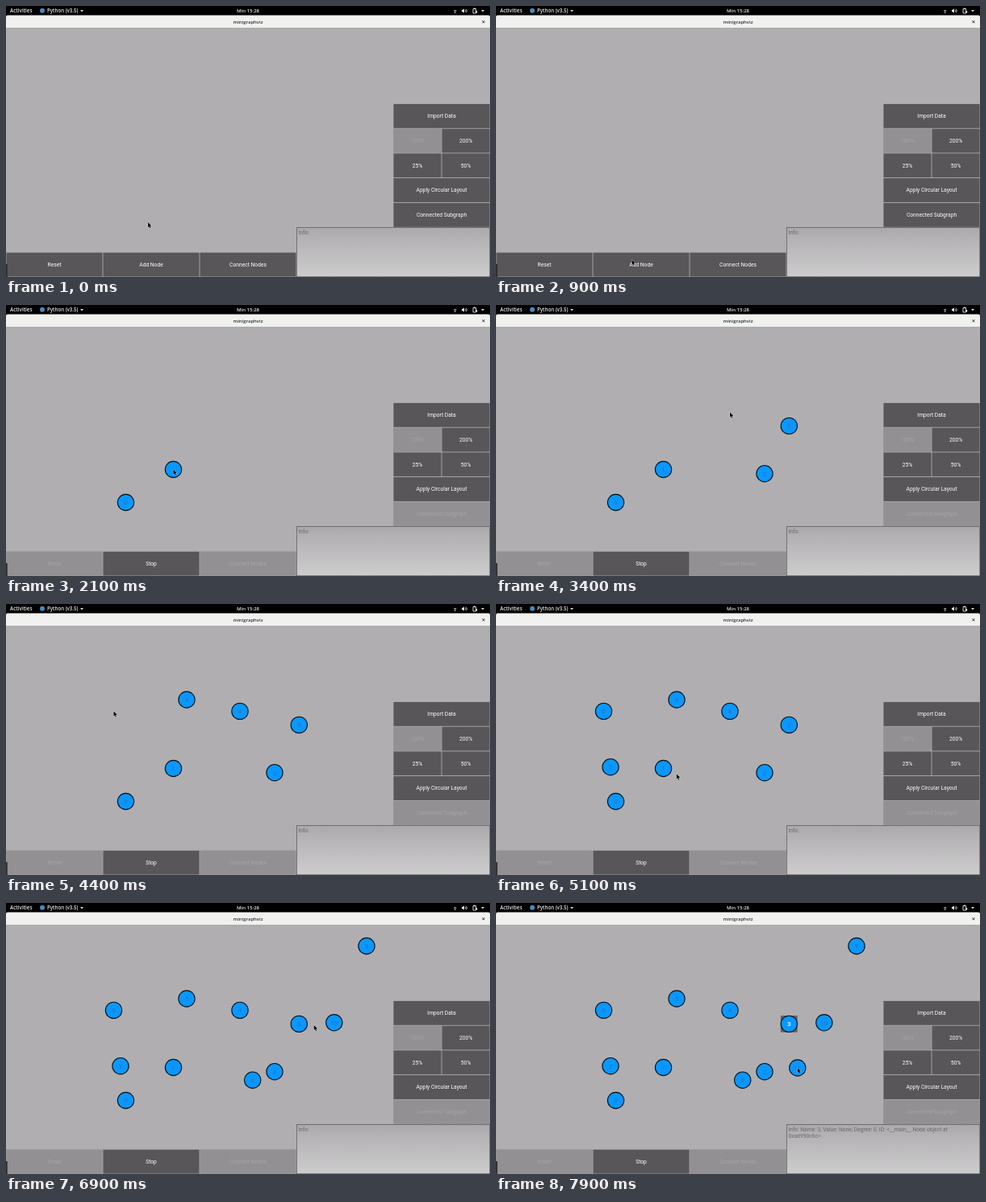
Animation, 600 px wide and 337 px high, one loop 8000 ms. Source, as an HTML page with a canvas:

```html
<!DOCTYPE html>
<html lang="en">
<head>
<meta charset="utf-8">
<title>minigraphviz</title>
<style>
html, body { margin: 0; width: 100%; height: 100%; overflow: hidden; background: #b0aeb0; }
canvas { display: block; width: 100vw; height: 100vh; }
</style>
</head>
<body>
<canvas id="stage"></canvas>
<script>
const W = 600, H = 337, LOOP = 8000, STEP = 100;
const canvas = document.getElementById('stage');
const ctx = canvas.getContext('2d');
const UI = 'Roboto, sans-serif';
const SHELL = '"Open Sans", "Noto Sans", sans-serif';
const BG = '#b0aeb0', DARK = '#585658', MUTED = '#929092', LIGHT = '#e6e6e6';
const ADD_MODE = 1000, SELECT = 7200;
const REST = 200, TRAVEL = 300;
const ROW = 30.75, COL = 120, PANEL_Y = 275.2;

// Places the pointer visits and the moment it leaves; a click there may add a node
const stop = (t, x, y) => ({ t, x, y });
const click = (t, x, y) => ({ t, x, y, adds: true });
const stops = [
  stop(400, 176, 269), stop(1100, 168.5, 315.5),
  click(1700, 148.5, 245.5), click(2100, 207.5, 204.5),
  click(2500, 333, 209.7), click(3100, 363.3, 150.4),
  click(3700, 290, 133.4), click(4000, 224, 119),
  click(4600, 133.5, 133.4), click(5000, 142, 202.7),
  click(5400, 305.7, 220.2), stop(5900, 420, 71.5),
  click(6200, 447, 53.5), click(6700, 406.8, 148.8),
  stop(SELECT, 373, 153), click(7700, 373.8, 205)
];
const nodes = stops.filter(s => s.adds);

// Each trip ends in time to rest before the next click
function pointerAt(t) {
  const i = stops.findIndex(s => s.t > t);
  if (i === 0) return stops[0];
  if (i < 0) return stops[stops.length - 1];
  const a = stops[i - 1], b = stops[i];
  const u = Math.min(1, (t - a.t) / Math.min(TRAVEL, b.t - a.t - REST));
  const k = u * u * (3 - 2 * u);
  return { x: a.x + (b.x - a.x) * k, y: a.y + (b.y - a.y) * k };
}

function rect(x, y, w, h, fill) {
  ctx.fillStyle = fill;
  ctx.fillRect(x, y, w, h);
}

function text(str, x, y, size, color, family = UI, align = 'center', weight = 400) {
  ctx.font = `${weight} ${size}px ${family}`;
  ctx.textAlign = align;
  ctx.fillStyle = color;
  ctx.fillText(str, x, y);
}

function poly(points, fill) {
  ctx.beginPath();
  points.forEach(([x, y]) => ctx.lineTo(x, y));
  ctx.closePath();
  ctx.fillStyle = fill;
  ctx.fill();
}

function disc(x, y, r, fill) {
  ctx.beginPath();
  ctx.arc(x, y, r, 0, Math.PI * 2);
  ctx.fillStyle = fill;
  ctx.fill();
}

function stroke(width, color, trace) {
  ctx.beginPath();
  trace();
  ctx.lineWidth = width;
  ctx.strokeStyle = color;
  ctx.stroke();
}

function button(label, x, y, w, off) {
  rect(x, y, w, ROW, off ? '#a3a1a3' : '#b5b3b5');
  rect(x + 0.4, y + 0.4, w - 0.8, ROW - 0.8, off ? MUTED : DARK);
  text(label, x + w / 2, y + ROW / 2 + 2.2, 6.7, off ? '#a6a4a6' : '#fff');
}

function controls(adding) {
  const side = [['Import Data'], ['100%', '200%'], ['25%', '50%'],
    ['Apply Circular Layout'], ['Connected Subgraph']];
  side.forEach((row, i) => row.forEach((label, j) => {
    const w = COL / row.length;
    const off = label === '100%' || (adding && label === 'Connected Subgraph');
    button(label, W - COL + j * w, PANEL_Y - ROW * (side.length - i), w, off);
  }));
  ['Reset', adding ? 'Stop' : 'Add Node', 'Connect Nodes'].forEach((label, i) =>
    button(label, i * COL, H - ROW, COL, adding && i !== 1));
}

function caret(x, y) {
  poly([[x - 2, y - 1], [x + 2, y - 1], [x, y + 1.3]], LIGHT);
}

function arcs(x, y, radii, from, to) {
  radii.forEach(r => stroke(0.8, LIGHT, () => ctx.arc(x, y, r, from, to)));
}

function statusIcons() {
  arcs(556.7, 8.2, [1.4, 2.7], -Math.PI * 0.72, -Math.PI * 0.28);
  disc(556.7, 8.2, 0.7, LIGHT);
  rect(565, 4.8, 1.3, 2.4, LIGHT);
  poly([[566, 5], [568, 3.2], [568, 8.8], [566, 7]], LIGHT);
  arcs(568.2, 6, [1.6, 3], -0.9, 0.9);
  stroke(0.9, LIGHT, () => ctx.rect(579, 3.5, 3.6, 5.5));
  rect(580, 2.5, 1.6, 1, LIGHT);
  rect(582.2, 6.2, 2, 2.3, LIGHT);
  caret(591, 6);
}

function shellBars() {
  const top = 11.4, bottom = 27.4;
  rect(0, 0, W, bottom, '#000');
  text('Activities', 5, 8.2, 6.3, LIGHT, SHELL, 'left', 600);
  disc(45, 5.8, 3, '#4b8bbe');
  text('Python (v3.5)', 51, 8.2, 6.15, LIGHT, SHELL, 'left', 600);
  caret(94, 6);
  text('Min 15:28', 300, 8.2, 6.05, LIGHT, SHELL, 'center', 600);
  statusIcons();
  ctx.beginPath();
  ctx.roundRect(0, top, W, bottom - top, [2, 2, 0, 0]);
  ctx.fillStyle = '#f1f1f0';
  ctx.fill();
  text('minigraphviz', 300, 21.8, 5.95, '#2e3436', SHELL, 'center', 600);
  stroke(1, '#2e3436', () => [-1.5, 1.5].forEach(d => {
    ctx.moveTo(590.4, 19.7 - d);
    ctx.lineTo(593.4, 19.7 + d);
  }));
}

function infoBox(selected) {
  const x = 3 * COL;
  const g = ctx.createLinearGradient(0, PANEL_Y, 0, H);
  g.addColorStop(0, '#aaa8aa');
  g.addColorStop(0.2, '#b3b1b3');
  g.addColorStop(1, '#cecdce');
  rect(x, PANEL_Y, W - x, H - PANEL_Y, '#626062');
  rect(x + 0.8, PANEL_Y + 0.8, W - x - 1.4, H - PANEL_Y - 1.5, g);
  const lines = selected
    ? ['Info: Name: 3, Value: None, Degree: 0, ID: <__main__.Node object at', '0xad990c6c>']
    : ['Info:'];
  lines.forEach((line, i) =>
    text(line, x + 2.4, 284.4 + i * 7.9, 6.7, '#6a686a', UI, 'left'));
}

function node(label, x, y, selected) {
  if (selected) rect(x - 10.4, y - 10.4, 20.8, 20.8, '#646264');
  disc(x, y, 10.7, '#06121c');
  disc(x, y, 9.6, '#0a97ff');
  text(label, x, y + 2.8, 8, selected ? '#fff' : '#2474b8', UI, 'center', selected ? 500 : 400);
}

function pointer({ x, y }) {
  ctx.save();
  ctx.translate(x, y);
  ctx.scale(0.88, 0.88);
  const shape = [[0, 0], [0, 7], [1.6, 5.6], [2.7, 8.2], [3.9, 7.7], [2.8, 5.2], [4.9, 5]];
  ctx.lineJoin = 'round';
  stroke(0.9, '#e8e8e8', () => {
    shape.forEach(([a, b]) => ctx.lineTo(a, b));
    ctx.closePath();
  });
  poly(shape, '#000');
  ctx.restore();
}

function draw(t) {
  const selected = t >= SELECT;
  rect(0, 0, W, H, BG);
  shellBars();
  controls(t >= ADD_MODE);
  infoBox(selected);
  rect(0, 321, 1.7, 16, '#2b2b2b');
  nodes.forEach((n, i) => {
    if (t >= n.t) node(i, n.x, n.y, selected && i === 3);
  });
  pointer(pointerAt(t));
}

function resize() {
  const dpr = window.devicePixelRatio || 1;
  canvas.width = Math.round(innerWidth * dpr);
  canvas.height = Math.round(innerHeight * dpr);
  ctx.setTransform(canvas.width / W, 0, 0, canvas.height / H, 0, 0);
}

const start = performance.now();
function tick() {
  const t = (performance.now() - start) % LOOP;
  draw(Math.floor(t / STEP) * STEP);
  requestAnimationFrame(tick);
}

addEventListener('resize', resize);
resize();
tick();
</script>
</body>
</html>
```
